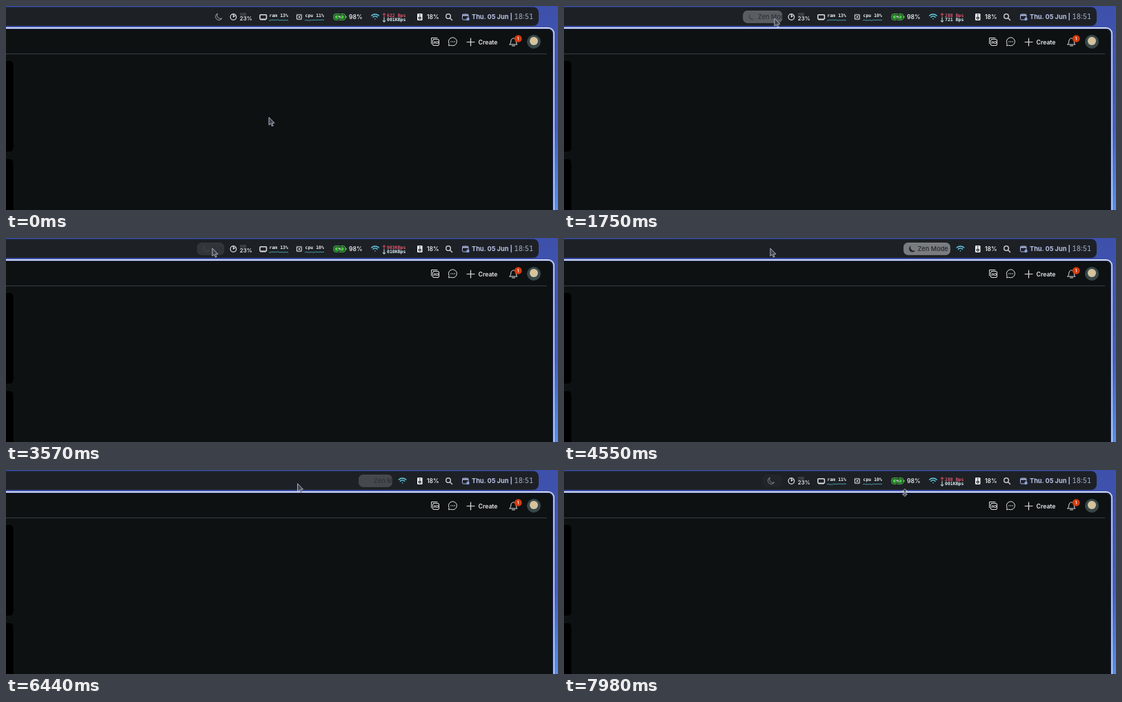
Write an HTML page that moves like this. It is 800 px wide and 297 px high and loops after 8000 ms.

```html
<!DOCTYPE html>
<html lang="en">
<head>
<meta charset="utf-8">
<style>
  html, body { margin: 0; width: 100%; height: 100%; overflow: hidden; background: #0d1112; }
  svg { display: block; width: 800px; height: 297px; }
  text { font-family: Inter, sans-serif; fill: #e8eaec; white-space: pre; }
  .pct { font-size: 8.5px; font-weight: 600; }
  .mono { font: bold 6.5px "DejaVu Sans Mono", monospace; }
  .line { fill: none; stroke: #dfe2e4; stroke-linecap: round; stroke-linejoin: round; }
</style>
</head>
<body>
<svg viewBox="0 0 800 297">
  <defs>
    <linearGradient id="wall" x2="0" y2="1">
      <stop stop-color="#3d50aa"/><stop offset=".6" stop-color="#4260c2"/><stop offset="1" stop-color="#5590ea"/>
    </linearGradient>
    <clipPath id="pillClip"><rect id="clipBox" y="7" height="18" rx="6"/></clipPath>
    <path id="crescent" d="M-1.5 -5A5 5 0 1 0 5 2A5 5 0 0 1 -1.5 -5Z"/>
  </defs>
  <rect width="800" height="297" fill="url(#wall)"/>

  <!-- menu bar -->
  <rect x="-20" y="1.5" width="792" height="27.5" rx="8" fill="#1d2126"/>

  <!-- window -->
  <rect x="-20" y="32" width="814" height="300" rx="8" fill="#0d1112" stroke="#d3d9f3" stroke-width="1.8"/>
  <rect x="-20" y="33.5" width="812.5" height="300" rx="7" fill="none" stroke="#2b3a7a" stroke-opacity=".7" stroke-width="1.2"/>
  <path d="M0 69.7H784" stroke="#3a4144"/>
  <rect x="-20" y="80" width="30.5" height="132" rx="5"/>
  <rect x="-20" y="223" width="30.5" height="132" rx="5"/>

  <!-- window header -->
  <g class="line">
    <rect x="618.5" y="48.5" width="9" height="9" rx="1.5"/>
    <path d="M616.5 55V46.5H625"/>
    <path d="M643 57.5L641.7 58L642 54.5A6 6 0 1 1 645 57.4Z"/>
    <path d="M668 52.5H679M673.5 47V58" stroke-width="1.2"/>
    <path d="M730 56H741C739 54 739.5 52 739 50C738 46 733 46 732 50C731.5 52 732 54 730 56ZM733.5 58H737.5"/>
    <path d="M645 52H645.1M647.5 52H647.6M650 52H650.1" stroke-width="1.4"/>
  </g>
  <text x="619.7" y="55.2" font-size="5" font-weight="700">AD</text>
  <text x="684.5" y="55.7" font-size="8.7" font-weight="600">Create</text>
  <circle cx="742.3" cy="47.5" r="5.3" fill="#d93a0c"/>
  <text x="742.2" y="50" font-size="6.5" font-weight="600" text-anchor="middle">1</text>
  <circle cx="765" cy="52" r="10" fill="#39474a"/>
  <circle cx="765" cy="51" r="6" fill="#d5c39c"/>

  <!-- always visible menu items -->
  <rect x="596" y="11" width="7.5" height="10" rx="1.2" fill="#f0f2f4"/>
  <circle cx="599.7" cy="17.5" r="1.5" fill="none" stroke="#1d2126" stroke-width="1.3"/>
  <circle cx="599.7" cy="13" r=".9" fill="#1d2126"/>
  <text class="pct" x="610" y="19.2">18%</text>
  <g class="line" stroke-width="1.3"><circle cx="641" cy="15" r="3.3"/><path d="M643.6 17.6L646.5 20.5"/></g>
  <rect x="661.5" y="12" width="8.5" height="8" rx="1.3" fill="none" stroke="#aab6e0"/>
  <path d="M661.5 13.5H670" stroke="#aab6e0" stroke-width="2"/>
  <circle cx="669.5" cy="19" r="2.2" fill="#8fa2dd"/>
  <text x="675" y="19.2" font-size="9.2" font-weight="700" style="fill:#b9c2e4">Thu. 05 Jun |</text>
  <text x="736.5" y="19.2" font-size="9.7" style="fill:#a9b1cd;font-variant-numeric:tabular-nums">18:51</text>
  <g id="wifi" fill="none" stroke="#63cfe8" stroke-width="1.5" stroke-linecap="round">
    <path d="M529.8 14A7.500 7.500 0 0 1 540.2 14M531.9 16.3A4.500 4.500 0 0 1 538.1 16.3M535 18.8H535.1"/>
  </g>

  <!-- items hidden in zen mode -->
  <g id="stats">
    <g class="line" stroke-width="1.2"><circle cx="329.5" cy="16" r="4.3"/><path d="M329.5 16V12M329.5 16L332 14"/></g>
    <text x="339" y="13.8" font-size="4.6" style="fill:#858b91">SSD</text>
    <text class="pct" x="338.7" y="20.7" style="font-size:8px">23%</text>
    <rect x="368" y="12.7" width="9.5" height="6.5" rx="1" class="line" stroke-width="1.5"/>
    <path d="M369 20.5H377" stroke="#dfe2e4" stroke-dasharray="1 1"/>
    <text class="mono" id="ram" x="381.5" y="15.7"></text>
    <rect x="422" y="13" width="6" height="6" class="line"/>
    <rect x="424" y="15" width="2" height="2" fill="#dfe2e4"/>
    <rect x="421.2" y="12.2" width="7.6" height="7.6" fill="none" stroke="#dfe2e4" stroke-width=".7" stroke-dasharray=".8 1"/>
    <text class="mono" id="cpu" x="433.5" y="15.7"></text>
    <g fill="none" stroke="#4ba6b8" stroke-width=".9"><path id="ramGraph"/><path id="cpuGraph"/></g>
    <rect x="475" y="11.7" width="16.5" height="8.5" rx="2.5" fill="#1d2126" stroke="#4bdc45"/>
    <rect x="476.7" y="13.4" width="13" height="5.1" rx="1" fill="#43cf3e"/>
    <path d="M493 14.5V17.5" stroke="#4bdc45" stroke-width="1.3"/>
    <path d="M484.5 11L480.5 16.5H483.5L482 21L486.5 15H483.6Z" fill="#e9ffe6" stroke="#1d2126" stroke-width=".8"/>
    <text class="pct" x="497" y="19.2">98%</text>
    <path d="M548 16V11M546 13L548 10.5L550 13" fill="none" stroke="#e0566c"/>
    <path d="M548 16.5V23M546 21L548 23.5L550 21" fill="none" stroke="#d8f0f4"/>
    <text class="mono" id="up" x="552" y="15.7" style="fill:#e0566c"></text>
    <text class="mono" id="down" x="552" y="21.9" style="fill:#d8f0f4"></text>
  </g>

  <!-- zen pill, laid out against its right edge -->
  <g id="zen">
    <rect id="pill" y="7" height="17.5" rx="6" fill="#fff" stroke="#fff"/>
    <g clip-path="url(#pillClip)">
      <text id="label" y="19.2" font-size="9.2" font-weight="500" style="fill:#22242d">Zen Mode</text>
    </g>
    <use id="darkMoon" href="#crescent" fill="#24262f"/>
    <use id="paleMoon" href="#crescent" fill="none" stroke="#a0a4a9"/>
  </g>

  <g fill="#3d424d" stroke="#b9bfcc" stroke-width=".9">
    <path id="arrow" d="M0 0V11.3L2.6 9L4.5 13L6.3 12.1L4.5 8.3H8Z"/>
    <path id="resize" d="M0 -5.5L3.5 -2H1V2H3.5L0 5.5L-3.5 2H-1V-2H-3.5Z"/>
  </g>
</svg>

<script>
const DURATION = 8000;
const GLIDE = 500;
const $ = id => document.getElementById(id);
const set = (id, attrs) => { for (const k in attrs) $(id).setAttribute(k, attrs[k]); };

const clamp = v => Math.max(0, Math.min(1, v));
const smooth = v => v * v * (3 - 2 * v);
const ramp = (t, from, to) => smooth(clamp((t - from) / (to - from)));

// Each glide starts at a given time and eases to its point.
const home = { x: 381, y: 162 };
const glides = [
  { at: 830, x: 305, y: 18 },   // onto the moon
  { at: 2450, x: 374, y: 41 },  // away
  { at: 3000, x: 299, y: 15 },  // back to switch zen mode on
  { at: 4700, x: 547, y: 18 },  // onto the zen pill
  { at: 6160, x: 337, y: 21 },  // away
  { at: 6660, x: 530, y: 18 },  // back to switch zen mode off
  { at: 7480, x: 494, y: 33 }   // down to the window edge
];

function pointerAt(t) {
  let { x, y } = home;
  for (const g of glides) {
    const k = ramp(t, g.at, g.at + GLIDE);
    x += (g.x - x) * k;
    y += (g.y - y) * k;
  }
  return `translate(${x} ${y})`;
}

// How far the pill is open: hover, leave, click, then a slow retreat.
const openness = t =>
  ramp(t, 1330, 1950) - ramp(t, 2450, 3350) + ramp(t, 3400, 3800) - ramp(t, 4130, 9350);

function network(t) {
  if (t < 1050) return ["622 Bps", "001KBps"];
  if (t < 2240) return ["288 Bps", "721 Bps"];
  return t < 6900 ? ["003KBps", "010KBps"] : ["288 Bps", "001KBps"];
}

function graph(x, seed) {
  let d = `M${x} 21`;
  for (let i = 1; i <= 14; i++) d += `L${x + i * 2} ${20.6 + .5 * Math.sin(i * i + seed)}`;
  return d;
}

function drawPill(open, zen) {
  const width = 20 + 48 * open, left = 316 - width;
  const fill = .42 * open ** 1.6;
  const moonAt = `translate(${left + 12} 16)`;
  set("zen", { transform: `translate(${243.5 * zen} 0)` });
  set("pill", { x: left, width, "fill-opacity": fill, "stroke-opacity": fill / 2 });
  set("clipBox", { x: left, width });
  set("label", { x: left + 20 + 6 * open * (1 - open), opacity: open });
  set("darkMoon", { transform: moonAt, opacity: ramp(open, .62, 1) });
  set("paleMoon", { transform: moonAt, opacity: 1 - ramp(open, 0, .5) });
}

function drawStats(t, zen) {
  const ram = t < 6900 ? 13 : 11, cpu = t < 1050 ? 11 : 10;
  set("stats", { opacity: 1 - zen });
  set("wifi", { transform: `translate(${39.5 * zen} 0)` });
  $("ram").textContent = `ram ${ram}%`;
  $("cpu").textContent = `cpu ${cpu}%`;
  [$("up").textContent, $("down").textContent] = network(t);
  set("ramGraph", { d: graph(381, ram) });
  set("cpuGraph", { d: graph(433, cpu) });
}

function draw(t) {
  const zen = ramp(t, 3780, 4060) - ramp(t, 7150, 7480);
  drawPill(openness(t), zen);
  drawStats(t, zen);
  const transform = pointerAt(t), resizing = t > 7900;
  set("arrow", { transform, opacity: resizing ? 0 : 1 });
  set("resize", { transform, opacity: resizing ? 1 : 0 });
}

const start = performance.now();
function tick() {
  draw((performance.now() - start) % DURATION);
  requestAnimationFrame(tick);
}
tick();
</script>
</body>
</html>
```
